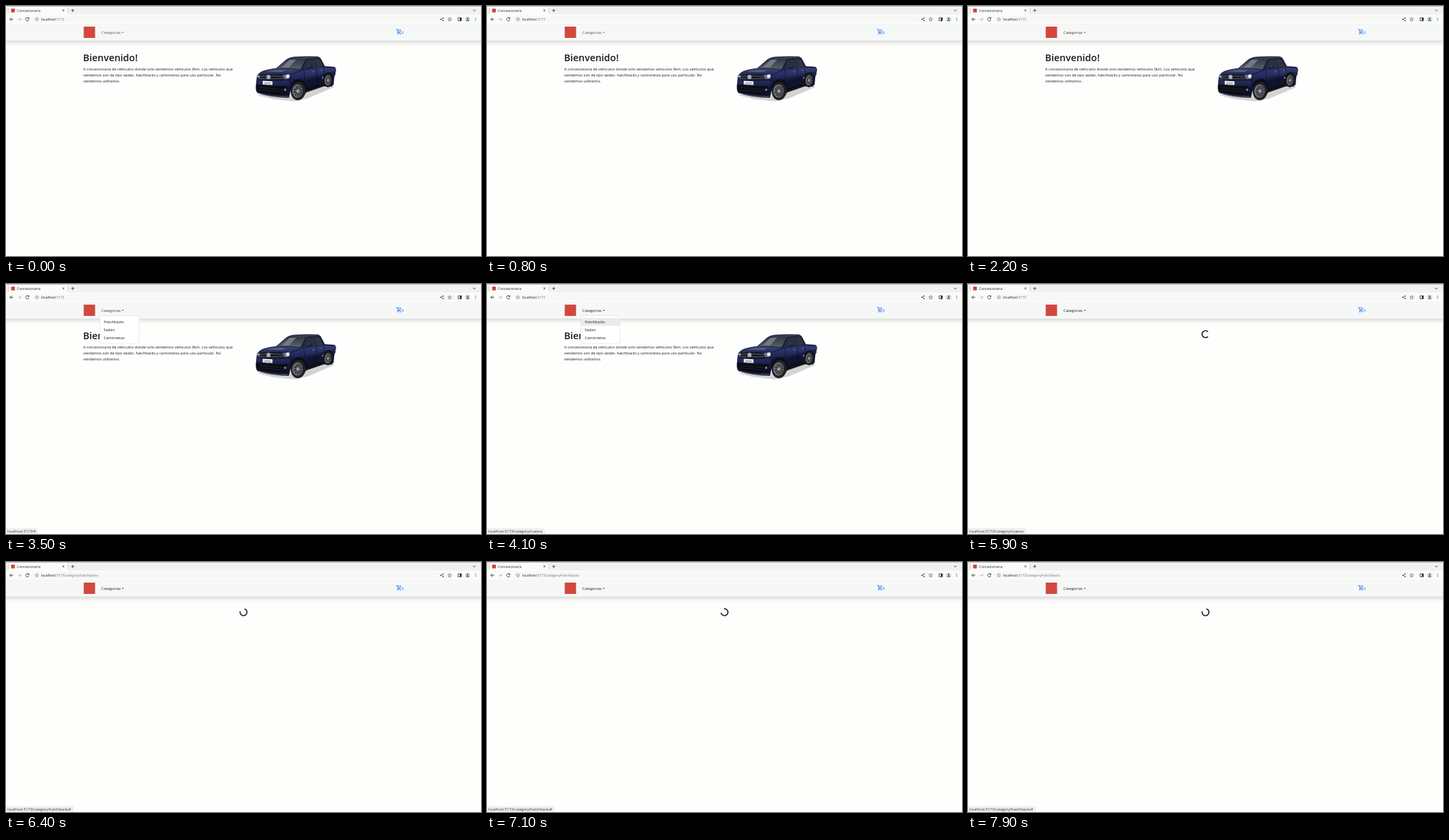
An HTML page with a canvas for the animation above (8000 ms loop, 712x376 px).

```html
<!DOCTYPE html>
<html lang="es">
<head>
<meta charset="utf-8">
<title>Concesionaria</title>
<style>
html, body { margin: 0; width: 100%; height: 100%; overflow: hidden; background: #fefefc; }
canvas { display: block; width: 712px; height: 376px; }
</style>
</head>
<body>
<canvas id="stage"></canvas>
<script>
const W = 712, H = 376, LOOP = 8000, STEP = 100;
const INK = '#15191d', BLUE = '#0d6efd', PAGE = '#fefefc';
const canvas = document.getElementById('stage');
const ctx = canvas.getContext('2d');
const ratio = window.devicePixelRatio || 1;
canvas.width = W * ratio;
canvas.height = H * ratio;

function rect(x, y, w, h, color) {
  ctx.fillStyle = color;
  ctx.fillRect(x, y, w, h);
}

function round(x, y, w, h, r, color) {
  ctx.fillStyle = color;
  ctx.beginPath();
  ctx.roundRect(x, y, w, h, r);
  ctx.fill();
}

function fill(d, color) {
  ctx.fillStyle = color;
  ctx.fill(new Path2D(d));
}

function line(d, color, width = 0.8) {
  ctx.strokeStyle = color;
  ctx.lineWidth = width;
  ctx.stroke(new Path2D(d));
}

function oval(x, y, rx, ry, color, tilt = 0) {
  ctx.fillStyle = color;
  ctx.beginPath();
  ctx.ellipse(x, y, rx, ry, tilt, 0, Math.PI * 2);
  ctx.fill();
}

function fade(top, bottom, ...colors) {
  const g = ctx.createLinearGradient(0, top, 0, bottom);
  colors.forEach((c, i) => g.addColorStop(i / (colors.length - 1), c));
  return g;
}

// Set large and scaled down, so that small glyphs keep fractional advances.
function text(str, x, y, size, color, weight = 400) {
  ctx.save();
  ctx.translate(x, y);
  ctx.scale(0.1, 0.1);
  ctx.font = `${weight} ${size * 10}px "Open Sans", "Noto Sans", sans-serif`;
  ctx.fillStyle = color;
  ctx.fillText(str, 0, 0);
  const width = ctx.measureText(str).width / 10;
  ctx.restore();
  return width;
}

function drawTabs() {
  rect(0, 0, W, 13.5, '#f1f2f0');
  round(3.5, 1.5, 89.5, 13, [3, 3, 0, 0], '#fbfcfa');
  rect(0, 0, W, 0.7, '#a3a4a2');
  line('M3.5 3V11M93 3V11', '#b4b6b5', 0.6);
  rect(7.7, 4, 5.6, 5.6, '#c9473f');
  text('Concesionaria', 16.3, 8.7, 5.35, '#26292c');
  line('M84.7 5.3L87.3 7.9M87.3 5.3L84.7 7.9', '#26292c', 0.8);
  line('M97.7 6.7H102.3M100 4.4V9', '#26292c', 0.8);
  line('M700 5.7L702 7.7L704 5.7', '#26292c', 0.9);
}

function drawToolbar(path) {
  rect(0, 13, W, 14, '#fbfcfa');
  round(40, 15, 632, 10, 5, '#f7f8f6');
  line('M11 20H5.8M8.2 17.5L5.7 20L8.2 22.5', '#303336', 0.9);
  line('M17.3 20H22.5M20.1 17.5L22.6 20L20.1 22.5', '#b2b4b5', 0.9);
  line('M34 18.4A2.5 2.5 0 1 0 34.4 20.8', '#303336', 0.9);
  fill('M34.7 17V19.6H32.1Z', '#303336');
  line('M48.5 20A2.2 2.2 0 1 1 44.1 20A2.2 2.2 0 1 1 48.5 20', '#5f6368', 0.6);
  line('M46.3 19.7V21.3M46.3 18.6V19.2', '#5f6368', 0.6);
  const host = text('localhost', 53, 21.8, 5.08, '#151719');
  text(':5173' + path, 53 + host, 21.8, 5.08, '#70757a');

  line('M655.2 18.2L652 19.9L655.2 21.7', '#3c4043', 0.6);
  oval(655.3, 18.1, 0.9, 0.9, '#3c4043');
  oval(651.9, 19.9, 0.9, 0.9, '#3c4043');
  oval(655.3, 21.8, 0.9, 0.9, '#3c4043');
  line('M665 17.3L665.8 19.1L667.7 19.3L666.3 20.6L666.7 22.4L665 21.5L663.3 22.4L663.7 20.6L662.3 19.3L664.2 19.1Z', '#3c4043', 0.6);
  line('M677.7 17.8H682.5V22.2H677.7Z', '#202124', 0.8);
  rect(680.4, 17.8, 2.2, 4.4, '#202124');
  oval(692, 20, 4, 4, '#d3dbe3');
  oval(692, 18.7, 1.2, 1.2, '#4d5c6b');
  fill('M689.6 22.3Q689.8 20.5 692 20.5T694.4 22.3Z', '#4d5c6b');
  for (const dy of [-1.8, 0, 1.8]) oval(704, 20 + dy, 0.6, 0.6, '#3c4043');
}

function drawNav(linkAlpha) {
  ctx.save();
  ctx.shadowColor = 'rgba(0,0,0,.15)';
  ctx.shadowBlur = 6 * ratio;
  ctx.shadowOffsetY = 3 * ratio;
  rect(-10, 27, W + 20, 25, '#f6f7f7');
  ctx.restore();
  rect(0, 26.6, W, 0.6, '#dfe1e0');
  rect(116.5, 31, 17, 17, '#d2483f');

  const ink = `rgba(0,0,0,${linkAlpha})`;
  text('Categorias', 143, 42, 5.8, ink);
  fill('M173.6 39.1H176.4L175 40.6Z', ink);

  line('M584.6 35.1H585.9L587.8 39H590.4L592 36', BLUE, 0.9);
  line('M586.8 36H591.6M587.7 39L586.8 40.4H591.6', BLUE, 0.8);
  oval(587.3, 42, 0.8, 0.8, BLUE);
  oval(591, 42, 0.8, 0.8, BLUE);
  text('0', 592.8, 42, 6, BLUE, 500);
}

function drawWheel(x, y, rx, ry) {
  ctx.save();
  ctx.translate(x, y);
  ctx.rotate(0.1);
  ctx.scale(rx, ry);
  oval(0, 0, 1, 1, '#202125');
  oval(-0.08, 0, 0.72, 0.72, '#77787c');
  for (let i = 0; i < 10; i++) {
    ctx.save();
    ctx.rotate(i * Math.PI / 5);
    fill('M-.06 -.22L-.13 -.62H.13L.06 -.22Z', '#38393d');
    ctx.restore();
  }
  oval(-0.08, 0, 0.16, 0.16, '#a5a6aa');
  ctx.restore();
}

function drawPickup() {
  // Ground shadow and dark underside
  fill('M376 134L400 140L432 143.5L452 139L492 122L486 117L440 126Z', '#d2d3d2');
  fill('M425 120L450 115L478 108L490 116L489 121L476 121L450 130L432 137Z', '#15161b');
  // Body shell
  fill('M376 106Q378 101 384 98Q393 94.5 405 93.5L420 80.5Q424 77 433 76.3Q450 75 466 75.8Q470 76 472 79L478 90.5L492 91.5Q495 92.5 494.6 97L492 108L491 119L486 118L482 104L474 108L472 118L450 126L446 113L436 112L428 120L424 138Q398 138 377 131Q374 128 374.5 120Z',
    fade(76, 132, '#2a304d', '#20274f', '#171c42', '#0e112b'));
  fill('M425 79Q440 76 463 76.6L470 78.6L450 79.6Z', '#3a405a');
  // Glass
  fill('M406.5 93.6L421.5 81.5Q424 80 432 79.9L448.5 80.2L441.5 95Q424 92.4 406.5 93.6Z',
    fade(80, 95, '#343941', '#596069'));
  fill('M425 81L435 80.5L424 92.8L413 92.8Z', '#737a82');
  fill('M446.5 94.5L452 82Q458 80 462.5 80L464 92.7Z', '#2b3038');
  fill('M464.6 80H469Q472 83.5 475 90.8L466 92.3Z', '#30353d');
  line('M443 95.5L450 80.4Q459 78.3 470 79.2L476.5 90.5', '#0d1022', 0.9);
  // Hood and flanks
  fill('M381 101.5Q390 95.5 407 94.6Q424 94.2 440 96.6L427 102Q402 100.5 381 103.5Z',
    fade(94, 104, '#3f486f', '#20285a'));
  fill('M389 98.7Q402 95.5 420 96.8L414 99Q400 98 389 98.7Z', '#5c6486');
  fill('M427 104L445 97L476 92.6L494 93.5L493 98.5L448 107.5L428 110Z',
    fade(92, 110, '#353e72', '#1d2457'));
  fill('M450 111L473 106L472 117.5L451 124Z', '#0f132f');
  line('M446.5 96L449 123M465 93L466.5 118M476 92L477.5 103', '#0b0e24', 0.7);
  line('M450 125.5L474 117.8', '#08090e', 1.8);
  line('M459 99.2L462.5 98.6M472 97L474.5 96.6', '#8188a5', 0.8);
  fill('M450.5 91L456.5 88.6Q460.5 89 460 94L452 95.5Z', '#1d2347');
  line('M452 91L456.5 89.4', '#566089', 0.8);
  line('M477 91.5L493 92.7', '#0e122c', 0.9);
  line('M494 95L493.3 104', '#612a3c', 0.9);
  // Face
  fill('M376.5 104.5Q398 101.5 415 104L417 110.8Q396 112 375.7 109.3Z', '#14161c');
  line('M378 106.2Q398 104 415 106.3M377 109Q398 109.8 416 109', '#858b94', 0.7);
  fill('M414.5 104L425 102.3Q427 105.5 423.5 109.5L417 110Z', '#68718a');
  oval(422.3, 105.8, 2.6, 2.8, '#e3e9f1');
  fill('M376.5 104.5L380 104L380.3 108L376 107.2Z', '#8e98aa');
  oval(393.5, 106.8, 3, 3.2, '#aab0ba');
  fill('M375.5 112Q397 114.5 422 112.5L426 117L422 121L375 117.5Z',
    fade(112, 121, '#29315e', '#161b40'));
  fill('M375 118L390 120.5L421 121L420.5 131L408 133L381 129.5L375.5 125Z', '#0b0c12');
  line('M379 122.5L417 126M379 126L417 129.5', '#2b2e39', 0.7);
  line('M377 130.5Q397 136.5 423 136', '#5d606b', 1.2);
  oval(418.5, 126, 1.7, 1.9, '#767c88');
  fill('M384.8 112.6L399.4 113.2V118.7L384.8 118.1Z', '#f3f4f4');
  text('pickup', 387.6, 116.9, 2.8, '#30333a', 600);
  // Wheels
  oval(438.5, 124, 12.5, 14, '#0b0d18', 0.12);
  drawWheel(438, 128, 11, 13.8);
  oval(483, 110.5, 7.8, 11, '#0b0d18', 0.1);
  drawWheel(483, 111.8, 6.6, 10.6);
}

function drawHome() {
  text('Bienvenido!', 115.5, 83.3, 14.4, INK, 600);
  [
    'A concesionaria de vehiculos donde solo vendemos vehiculos 0km. Los vehículos que',
    'vendemos son de tipo sedan, hatchbacks y camionetas para uso particular. No',
    'vendemos utilitarios.'
  ].forEach((str, i) => text(str, 115.8, 97 + i * 8.9, 5.65, INK, 500));
  drawPickup();
}

function drawMenu(rowColor, rowInk) {
  round(140.5, 47.6, 59.3, 42, 2.2, '#d5d6d6');
  round(140.9, 48, 58.5, 41.2, 1.9, '#ffffff');
  if (rowColor) rect(140.9, 51, 58.5, 11.8, rowColor);
  ['Hatchbacks', 'Sedan', 'Camionetas'].forEach((str, i) =>
    text(str, 146.6, 59.1 + i * 11.8, 5.65, i ? INK : rowInk, 500));
}

function drawSpinner(ms) {
  const start = Math.PI / 4 + ms / 750 * Math.PI * 2;
  ctx.strokeStyle = INK;
  ctx.lineWidth = 1.6;
  ctx.beginPath();
  ctx.arc(356, 75.5, 5.2, start, start + Math.PI * 1.5);
  ctx.stroke();
}

function drawStatus(path, right, alpha) {
  ctx.save();
  ctx.globalAlpha = alpha;
  round(-2, 367.8, right + 2, 10, [0, 2, 0, 0], '#d8dad9');
  round(-2, 368.2, right + 1.6, 10, [0, 1.8, 0, 0], '#f0f1f0');
  text('localhost:5173/' + path, 2, 374.2, 5.49, '#2c2f32');
  ctx.restore();
}

function linkAlphaAt(t) {
  if (t < 2200) return 0.65;
  if (t < 3500) return 0.78;
  return Math.min(0.9, 0.78 + (t - 3500) / 200 * 0.12);
}

function draw(t) {
  const loading = t >= 5900;
  ctx.setTransform(ratio, 0, 0, ratio, 0, 0);
  rect(0, 0, W, H, PAGE);
  drawTabs();
  drawNav(linkAlphaAt(t));
  drawToolbar(t >= 6000 ? '/category/hatchbacks' : '');

  if (loading) drawSpinner(t - 5900);
  else drawHome();

  if (t >= 3500 && !loading) {
    const pressed = t >= 5800;
    const hover = t >= 4000 ? '#e9ebec' : null;
    drawMenu(pressed ? BLUE : hover, pressed ? '#ffffff' : INK);
  }

  if (t >= 6400) drawStatus('category/hatchbacks#', 101, 1);
  else if (t >= 4100) drawStatus('category/nuevos', 86.5, 1);
  else if (t >= 2400) drawStatus('#', 47, t < 2500 ? 0.5 : 1);
}

function tick() {
  const t = performance.now() % LOOP;
  draw(Math.floor(t / STEP) * STEP);
  requestAnimationFrame(tick);
}
tick();
</script>
</body>
</html>
```
